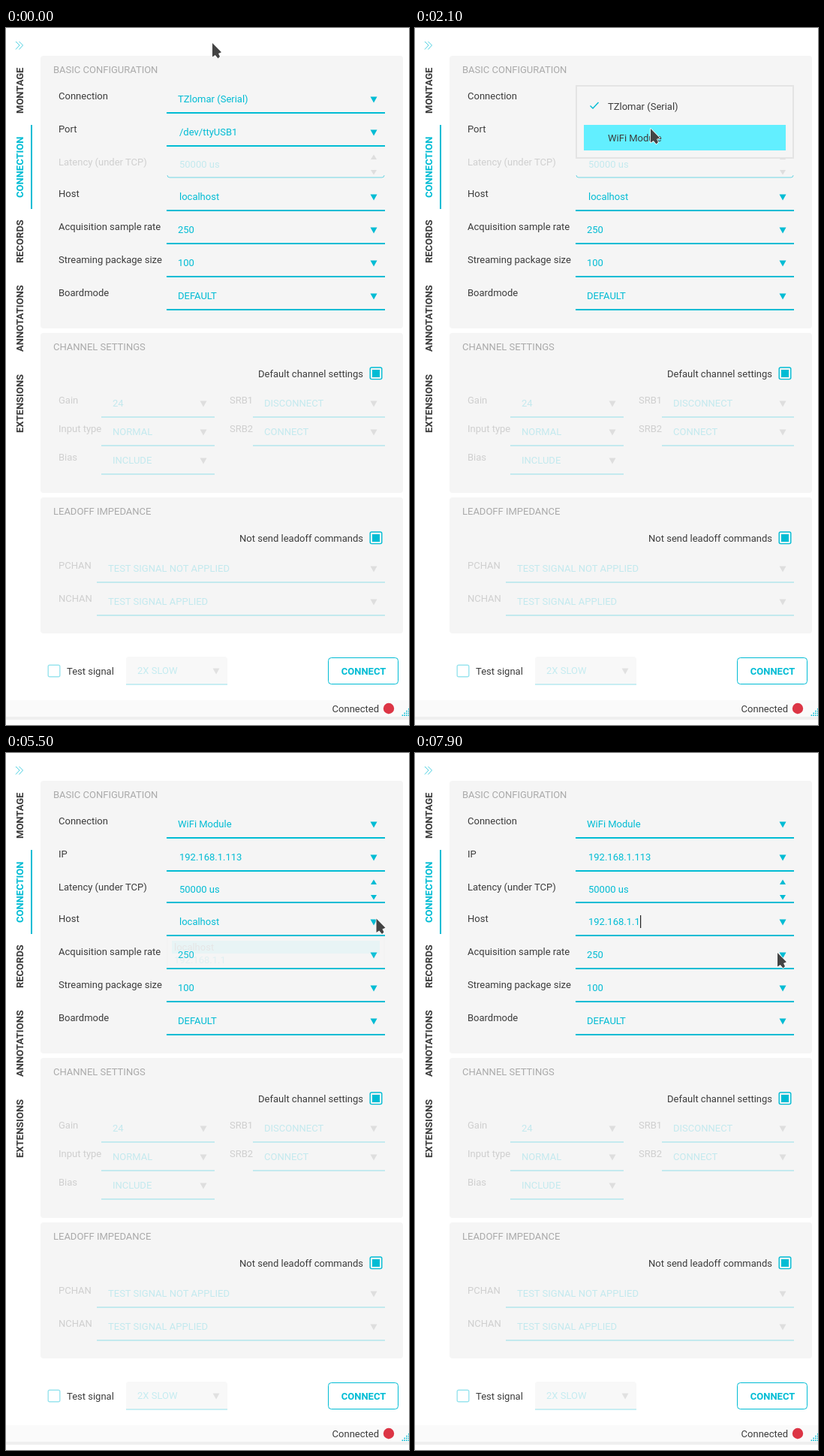
Recreate the animation shown at these times as an HTML page. Size 537 by 928 pixels, loop 8000 ms.

```html
<!DOCTYPE html>
<html lang="en">
<head>
<meta charset="utf-8">
<title>Connection settings</title>
<style>
  html, body { margin: 0; width: 100%; height: 100%; overflow: hidden; background: #fff; }
  svg { display: block; width: 537px; height: 928px; font: 13px Roboto, sans-serif; }
  text { fill: #3c3c3c; white-space: pre; }
  .cyan { fill: #00bcd4; }
  .bold { font-weight: bold; }
  .title { opacity: .4; }
  .off { opacity: .2; }
  .off .arrow { fill: #3c3c3c; opacity: .6; }
  .panel { fill: #f5f5f5; }
  .outline { fill: none; stroke: #00bcd4; }
  .popup { fill: #f5f5f5; stroke: #e4e4e4; stroke-width: 2; }
  .mark { fill: #62efff; }
</style>
</head>
<body>
<svg id="stage" viewBox="0 0 537 928"></svg>
<script>
const LOOP = 8000, STEP = 100;
const stage = document.getElementById('stage');

const text = (x, y, s, cls = '', extra = '') => `<text x="${x}" y="${y}" class="${cls}" ${extra}>${s}</text>`;
const rect = (x, y, w, h, cls, extra = '') =>
  `<rect x="${x}" y="${y}" width="${w}" height="${h}" class="${cls}" ${extra}/>`;
const path = (d, cls, extra = '') => `<path d="${d}" class="${cls}" ${extra}/>`;
const group = (cls, ...parts) => `<g class="${cls}">${parts.join('')}</g>`;
const arrow = (x, y) => path(`M${x - 4.5} ${y - 3.5}h9l-4.5 8z`, 'cyan arrow');

// A labelled drop-down, placed by the centre of its underline.
const combo = (label, labelX, value, x1, x2, line, { inset = 15, id = '' } = {}) =>
  text(labelX, line - 18, label, '', id && `id="${id}Label"`) +
  text(x1 + inset, line - 14, value, 'cyan', id && `id="${id}"`) +
  rect(x1, line - 1, x2 - x1, 2, 'cyan') + arrow(x2 - 15, line - 18);

const checkbox = (label, y) =>
  text(476, y + 5, label, '', 'text-anchor="end"') +
  rect(485.2, y - 8, 15.6, 15.6, 'outline', 'rx="2" stroke-width="1.4"') +
  rect(488, y - 5, 10, 10, 'cyan');

const tab = (label, bottom, cls = '') =>
  text(0, 0, label, 'bold ' + cls, `transform="translate(23 ${bottom}) rotate(-90)"`);

const panel = (y, h, title) => rect(46, y, 483, h, 'panel', 'rx="4"') + text(63, y + 23, title, 'title');

const grip = [0, 1, 2, 3].map(row => Array.from({ length: row + 1 }, (_, i) =>
  rect(536 - 2.8 * i, 906 + 2.8 * row, 1.6, 1.6, 'cyan')).join('')).join('');

stage.innerHTML = [
  path('M13 18l5 5-5 5.5M17.5 18l5 5-5 5.5', 'outline', 'opacity=".7"'),
  tab('MONTAGE', 114), tab('CONNECTION', 226, 'cyan'), tab('RECORDS', 313),
  tab('ANNOTATIONS', 431), tab('EXTENSIONS', 539),
  rect(33, 129, 2, 112, 'cyan'),

  panel(37, 363, 'BASIC CONFIGURATION'),
  combo('Connection', 70, '', 214, 505, 113, { id: 'link' }),
  combo('Port', 70, '', 214, 505, 157, { inset: 17, id: 'port' }),
  '<g id="latency">',
  text(70, 183, 'Latency (under TCP)'), text(231, 186, '50000 us', 'cyan'),
  path('M486 175h8l-4-6.5zM486 189h8l-4 6.5z', 'cyan arrow'), '</g>',
  rect(214, 198, 291, 2, 'cyan', 'id="latencyLine"'),
  path('M215 196q0 3 3 3h283q3 0 3-3', 'outline', 'id="latencyEdge" opacity=".55"'),
  combo('Host', 70, '', 214, 505, 243, { inset: 17, id: 'host' }),
  rect(300, 216, 1.2, 17, '', 'id="caret" fill="#222"'),
  combo('Acquisition sample rate', 70, '250', 214, 505, 287),
  combo('Streaming package size', 70, '100', 214, 505, 331),
  combo('Boardmode', 70, 'DEFAULT', 214, 505, 375),

  panel(406, 213, 'CHANNEL SETTINGS'),
  checkbox('Default channel settings', 460),
  group('off',
    combo('Gain', 70, '24', 127, 278, 518),
    combo('Input type', 70, 'NORMAL', 127, 278, 556),
    combo('Bias', 70, 'INCLUDE', 127, 278, 594),
    combo('SRB1', 298, 'DISCONNECT', 329, 505, 518),
    combo('SRB2', 298, 'CONNECT', 329, 505, 556)),

  panel(625, 181, 'LEADOFF IMPEDANCE'),
  checkbox('Not send leadoff commands', 679),
  group('off',
    combo('PCHAN', 70, 'TEST SIGNAL NOT APPLIED', 121, 505, 738),
    combo('NCHAN', 70, 'TEST SIGNAL APPLIED', 121, 505, 782)),

  rect(56.2, 848.2, 15.6, 15.6, 'outline', 'rx="2" stroke-width="1.4" opacity=".4"'),
  text(81, 861, 'Test signal'),
  path('M160 874v-33q0-4 4-4h127q4 0 4 4v33z', '', 'fill="#f8f8f8"'),
  group('off', combo('', 0, '2X SLOW', 160, 295, 874)),
  rect(429.5, 838.5, 93, 35, 'outline', 'rx="4"'),
  text(476.5, 861, 'CONNECT', 'bold cyan', 'text-anchor="middle"'),

  rect(0, 895, 537, 22, '', 'fill="#fafafa"'), rect(0, 917, 537, 4, '', 'fill="#efefef"'),
  text(497, 911, '', '', 'id="status" text-anchor="end"'),
  '<circle cx="510" cy="906" r="7.2" fill="#dc3545"/>', grip,

  '<g id="linkPopup">', rect(215, 77, 289, 96, 'popup'), rect(225, 87, 269, 34, 'mark', 'id="linkMark"'),
  path('M233.5 103.5l3.5 3.5 7.5-8', 'outline', 'id="tick" stroke-width="1.4"'),
  text(257, 109, 'TZlomar (Serial)'), text(257, 151, 'WiFi Module'), '</g>',

  '<g id="hostPopup">', rect(215, 244, 289, 43, 'popup'), rect(221, 250, 277, 17, 'mark', 'id="hostMark"'),
  text(224, 263, 'localhost', '', 'id="hostItem0"'), text(224, 280, '192.168.1.1', '', 'id="hostItem1"'), '</g>',

  path('M0 0V18.5L3.8 16 7.5 20.5 10 18 8 14 12 12.3z', '',
    'id="pointer" fill="#444" stroke="#fff" stroke-width="1.6" paint-order="stroke" stroke-linejoin="round"'),
].join('');

const el = Object.fromEntries([...stage.querySelectorAll('[id]')].map(e => [e.id, e]));

// Pointer tip: [time, x, y]
const route = [
  [400, 275, 20], [1100, 487, 96], [1700, 487, 96], [2100, 314, 134], [2400, 312, 136],
  [2800, 312, 136], [3200, 425, 92], [3500, 486, 138], [3700, 471, 186], [3800, 481, 191],
  [4100, 499, 205], [4500, 493.5, 220.5], [5900, 493.5, 220.5], [6500, 354, 269], [6900, 354, 269],
  [7700, 483, 266],
];

function pointerAt(t) {
  const next = route.findIndex(p => p[0] > t);
  if (next === 0) return route[0].slice(1);
  if (next < 0) return route.at(-1).slice(1);
  const [t0, x0, y0] = route[next - 1], [t1, x1, y1] = route[next];
  const u = (t - t0) / (t1 - t0), k = u * u * (3 - 2 * u);
  return [x0 + (x1 - x0) * k, y0 + (y1 - y0) * k];
}

const show = (e, opacity) => e.setAttribute('opacity', +opacity);
const put = (e, s) => { if (e.textContent !== s) e.textContent = s; };

// Value of the last [time, value] pair already reached.
const latest = (t, pairs) => pairs.reduce((v, [at, next]) => t >= at ? next : v, 0);

function draw(t) {
  const [x, y] = pointerAt(t);
  el.pointer.setAttribute('transform', `translate(${x} ${y})`);

  const wifi = t >= 2300, remote = t >= 6900;
  put(el.link, wifi ? 'WiFi Module' : 'TZlomar (Serial)');
  put(el.portLabel, wifi ? 'IP' : 'Port');
  put(el.port, wifi ? '192.168.1.113' : '/dev/ttyUSB1');
  el.latency.setAttribute('class', wifi ? '' : 'off');
  show(el.latencyLine, wifi);
  show(el.latencyEdge, wifi ? 0 : .55);
  put(el.host, remote ? '192.168.1.1' : 'localhost');
  show(el.caret, remote && (t < 7400 || t >= 7900));
  put(el.status, remote && t < 7400 ? 'No streaming' : 'Connected');

  show(el.linkPopup, latest(t, [[1500, .45], [1600, 1], [2300, .45], [2400, 0]]));
  const second = y > 122;
  el.linkMark.setAttribute('y', second ? 129 : 87);
  el.tick.style.stroke = second ? '' : '#fff';

  show(el.hostPopup, latest(t, [[5500, .08], [5600, .55], [5700, 1], [6900, .48], [7000, 0]]));
  const lower = y > 266 || remote;
  el.hostMark.setAttribute('y', lower ? 267 : 250);
  el.hostItem0.setAttribute('class', lower ? 'cyan' : '');
  el.hostItem1.setAttribute('class', lower ? '' : 'cyan');
}

function tick() {
  draw(Math.floor(performance.now() % LOOP / STEP) * STEP);
  requestAnimationFrame(tick);
}
tick();
</script>
</body>
</html>
```
